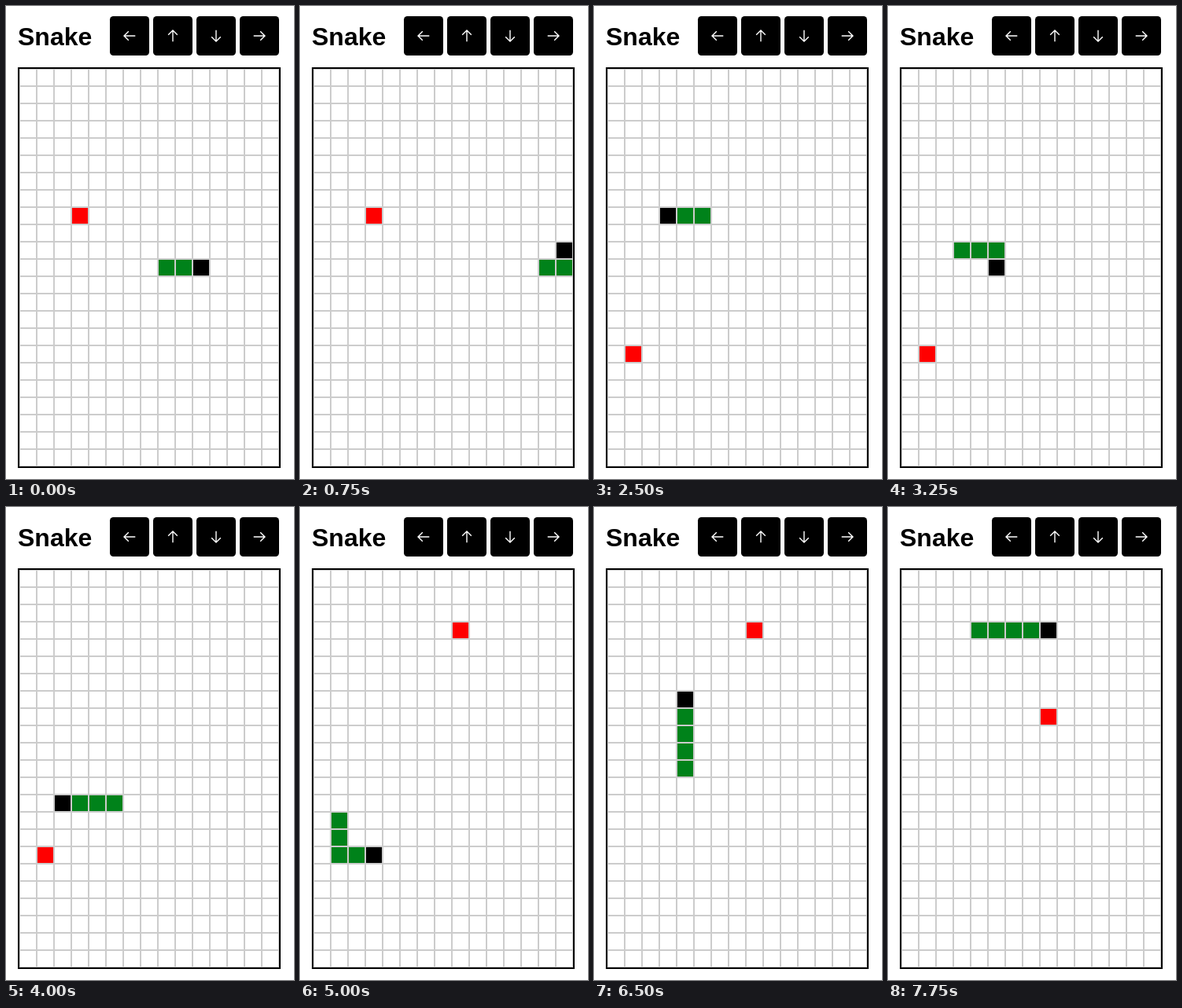
Recreate the animation shown at these times as an HTML page. Size 366 by 602 pixels, loop 8000 ms.

```html
<!DOCTYPE html>
<html lang="en">
<head>
<meta charset="utf-8">
<title>Snake</title>
<style>
  html, body { margin: 0; width: 100%; height: 100%; overflow: hidden; background: #fff; }
  svg { display: block; }
  text { font: bold 32px "Liberation Sans", Arial, sans-serif; }
  .arrow { fill: none; stroke: #fff; stroke-width: 1.4; }
</style>
</head>
<body>
<svg width="366" height="602" viewBox="0 0 366 602">
  <defs>
    <pattern id="cell" width="22" height="22" patternUnits="userSpaceOnUse">
      <rect width="22" height="22" fill="#ccc"/>
      <rect x="1" y="1" width="20" height="20" fill="#fff"/>
    </pattern>
    <g id="button">
      <rect x="-25" y="-25" width="50" height="50" rx="4.5"/>
      <path class="arrow" d="M7.3 0H-6.7M-1.2 -5.8L-7 0L-1.2 5.8"/>
    </g>
  </defs>
  <text x="15" y="50">Snake</text>
  <use href="#button" transform="translate(157 38)"/>
  <use href="#button" transform="translate(212 38) rotate(90)"/>
  <use href="#button" transform="translate(267 38) rotate(-90)"/>
  <use href="#button" transform="translate(322 38) rotate(180)"/>
  <rect x="15" y="78" width="334" height="510"/>
  <g transform="translate(17 80)">
    <rect width="330" height="506" fill="url(#cell)"/>
    <g id="pieces"></g>
  </g>
</svg>
<script>
const LOOP = 8000, TICK = 250, SIZE = 22;
const DIRS = { L: [-1, 0], R: [1, 0], U: [0, -1], D: [0, 1] };
const ROUTE = 'R4 U3 L11 D2 R2 D3 L4 L3 D3 R3 U13 R4'.replace('L4 L3', 'L4');
const MOVES_PER_TICK = '2212212222122122122121221221221';
const FOODS = [[3, 8], [1, 16], [8, 3], [8, 8]];
const MEALS = [18, 32, 52];
const START = 2; // trail index of the head before the first move

const trail = [[8, 11], [9, 11], [10, 11]];
for (const leg of ROUTE.split(' ')) {
  const [dx, dy] = DIRS[leg[0]];
  for (let i = +leg.slice(1); i > 0; i--) {
    const [x, y] = trail[trail.length - 1];
    trail.push([x + dx, y + dy]);
  }
}

const moves = [0];
for (const n of MOVES_PER_TICK) moves.push(moves[moves.length - 1] + +n);

const pieces = document.getElementById('pieces');

function square([x, y], color) {
  return `<rect x="${x * SIZE + 1}" y="${y * SIZE + 1}" width="20" height="20" fill="${color}"/>`;
}

function draw(n) {
  const eaten = MEALS.filter(m => n >= m).length;
  const length = 3 + MEALS.filter(m => n > m).length; // grows on the move after a meal
  const head = n + START;
  const body = trail.slice(head - length + 1, head);
  pieces.innerHTML = square(FOODS[eaten], '#f00')
    + body.map(p => square(p, '#00821a')).join('')
    + square(trail[head], '#000');
}

let shown = -1;
function frame() {
  const n = moves[Math.floor(performance.now() % LOOP / TICK)];
  if (n !== shown) draw(shown = n);
  requestAnimationFrame(frame);
}
frame();
</script>
</body>
</html>
```
